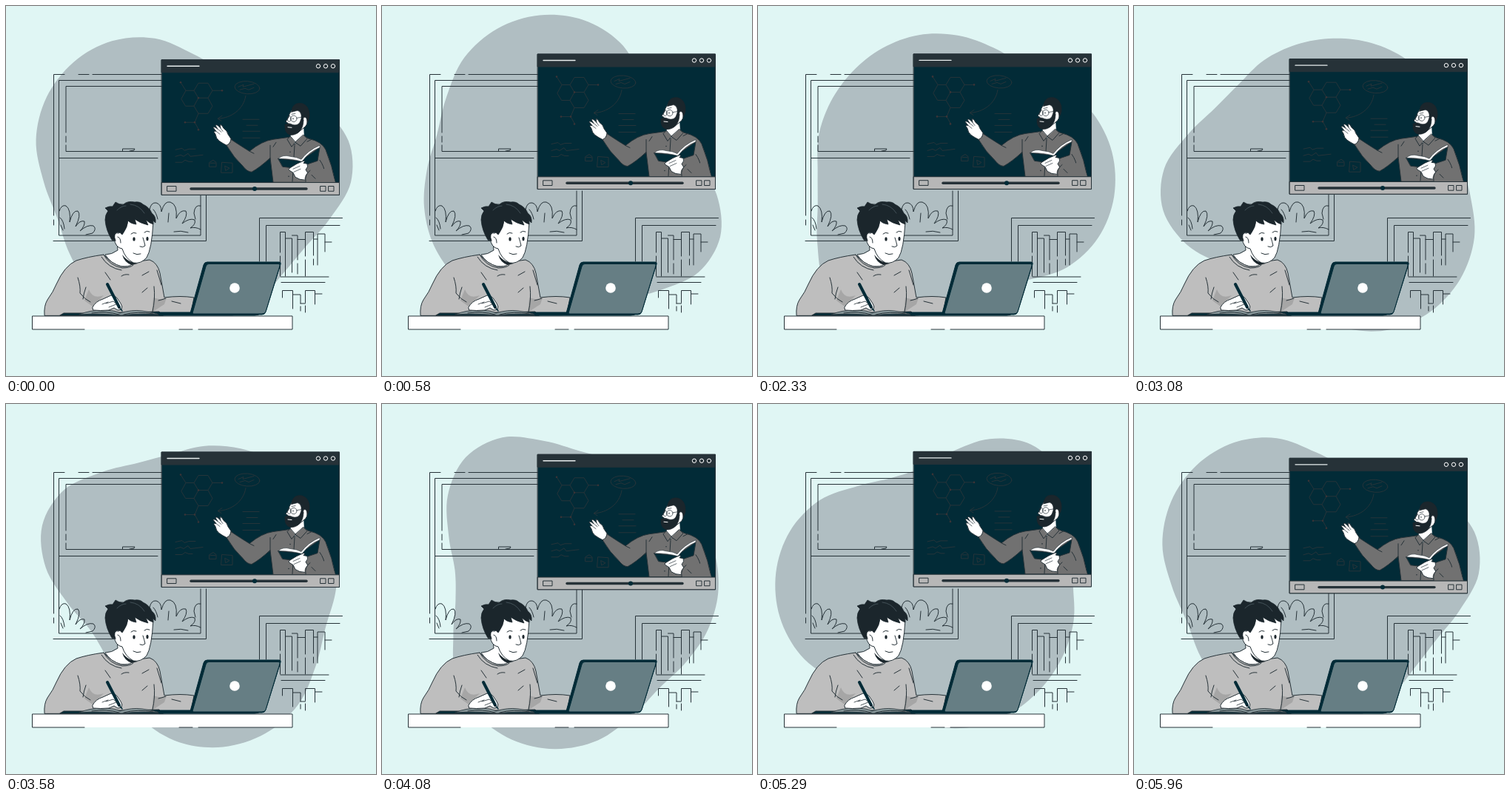
An HTML page with a canvas for the animation above (6 s loop, 500 px wide and 500 px high).

```html
<!DOCTYPE html>
<html lang="en">
<head>
<meta charset="utf-8">
<title>Online lesson</title>
<style>
html, body { margin: 0; width: 100%; height: 100%; overflow: hidden; background: #e0f6f4; }
canvas { display: block; width: 500px; height: 500px; }
</style>
</head>
<body>
<canvas id="stage" width="500" height="500"></canvas>
<script>
const ctx = document.getElementById('stage').getContext('2d');
const LOOP = 6000, FLOAT = 1500, RISE = 10;
const INK = '#263238', HAIR = '#1b262c', NAVY = '#022b37', PAPER = '#e0f6f4';
const WHITE = '#fff', KNIT = '#bebebe', BAR = '#b7b7b7', SHIRT = '#717171', SLATE = '#667e84', BLOB = '#b0bec2';

function shape(d, fill, stroke = INK, width = 1) {
  const p = new Path2D(d);
  if (fill) { ctx.fillStyle = fill; ctx.fill(p); }
  if (stroke) { ctx.strokeStyle = stroke; ctx.lineWidth = width; ctx.stroke(p); }
}
const line = (d, color = INK, width = 1) => shape(d, null, color, width);

function oval(x, y, rx, ry, fill, stroke, width = 1, tilt = 0) {
  ctx.beginPath();
  ctx.ellipse(x, y, rx, ry, tilt, 0, Math.PI * 2);
  if (fill) { ctx.fillStyle = fill; ctx.fill(); }
  if (stroke) { ctx.strokeStyle = stroke; ctx.lineWidth = width; ctx.stroke(); }
}

// Blob outline: radius at every 15 degrees
const radii = [213, 191, 175, 173, 182, 189, 195, 200, 202, 199, 193, 190,
  202, 220, 229, 229, 220, 201, 173, 156, 155, 173, 200, 217];
const knots = radii.map((r, i) => {
  const a = i * Math.PI / 12;
  return [r * Math.cos(a), r * Math.sin(a)];
});

function drawBlob(turn) {
  const n = knots.length, at = i => knots[(i + n) % n];
  ctx.save();
  ctx.translate(253, 238);
  ctx.rotate(turn);
  ctx.beginPath();
  ctx.moveTo(...at(0));
  for (let i = 0; i < n; i++) {
    const [a, b, c, d] = [at(i - 1), at(i), at(i + 1), at(i + 2)];
    ctx.bezierCurveTo(
      b[0] + (c[0] - a[0]) / 6, b[1] + (c[1] - a[1]) / 6,
      c[0] - (d[0] - b[0]) / 6, c[1] - (d[1] - b[1]) / 6, c[0], c[1]);
  }
  ctx.closePath();
  ctx.fillStyle = BLOB;
  ctx.fill();
  ctx.restore();
}

function drawRoom() {
  // window
  line('M64.5 283V92.5H79M98 92.5H112M117 92.5H212M64.5 289V296M64 317.5H270.5V250');
  line('M212 100.5H71.5V310H263V250');
  line('M212 108.5H81V171M81 176V184M81 188V196.5H212M72 205.5H205');
  line('M157.5 196V193H174L173 195L167 196');
  // bushes
  line('M72 277Q75 268 81 270Q88 275 86 292Q90 276 97 277Q102 282 94 298Q100 289 106 291Q107 297 100 304Q110 295 118 297Q123 301 117 307L108 309');
  line('M73 286Q78 290 79 301M74 296L77 303');
  line('M194 275Q196 265 203 266Q210 268 210 278Q214 263 222 265Q232 268 230 287Q235 275 243 277Q246 283 238 294Q248 286 255 289Q257 295 249 300Q256 298 263 302');
  line('M199 275Q203 279 205 288M220 280L219 292M263 270Q255 268 254 280L256 288M227 305Q236 303 246 306');
  // shelves
  line('M342.5 345V286.5H454.5M351.5 345V296.5H451M371 366H436M372 373.5H431');
  line('M370.5 333V305.5H377.5V365M370.5 338V365M377.5 314H386.5V360M386.5 310H394V343M394 348V362');
  line('M394 315.5H404.5M404.5 338V305.5H415.5V337M404.5 343V365M415.5 342V350M415.5 315H421M421 350V308H431V332M431 319H440');
  line('M373.5 394V384.5H387.5V409M387.5 390H398V402M404.5 401V384.5H417.5V403M417.5 389H427M398 402H404.5M398 406V412M404.5 405V414');
}

function drawDoodles() {
  const chalk = '#26343a', node = '#3a3437';
  line('M237 125L243 114H254L260 124L254 135H243ZM254 114L260 104H273L279 114L273 124H260M273 124L279 135L273 145H260L254 135', chalk);
  line('M243 114L236 103M279 114H292M260 145L255 157H242M255 157L260 166', chalk);
  for (const [x, y] of [[236, 103], [292, 114], [260, 124], [242, 157], [255, 157], [260, 167]])
    oval(x, y, 1.3, 1.3, node);
  oval(326, 110, 17, 8.5, null, chalk, 1, .08);
  line('M314 109L321 106L320 109L335 105M316 113L323 111L328 113L335 110', chalk);
  line('M324 121C321 140 304 151 287 152M292 148L286 152L291 155', chalk);
  line('M320 153H342M325 161H340M320 169H343M320 178H343', chalk);
  line('M229 194L238 192L241 195L247 193H256M229 203L236 201L240 203L246 199L249 203L266 201M229 211H238L242 208L247 210H252', chalk);
  line('M275 211L280 208L284 211V217H275ZM276 212H283M292 211L306 212V225H291ZM296 216L302 219L297 222Z', chalk);
}

function drawTeacher() {
  // neck and raised hand
  shape('M386 168L384 179L391 187L403 177L402 160Z', WHITE, null);
  shape('M305 181L300 189Q292 185 288 182Q284 179 283 173L281 170Q281 168 284 169L280 164Q281 162 286 166L283 161Q285 159 290 165L289 160Q292 160 294 165Q299 168 300 173Z', WHITE);
  line('M284 169L289 173M286 166L291 170M290 165L293 169', INK, .7);
  // shirt
  shape('M304 180Q319 190 329 196Q346 182 361 180L383 177L390 187L402 175L409 179Q427 183 432 194Q441 216 445 238H361L357 205Q343 218 332 224Q326 224 320 216Q308 205 298 188Q303 186 304 180Z', SHIRT);
  line('M357 188L357 206L354 208M329 196L335 199M424 208Q430 216 431 226M390 188L387 237M407 183L413 180M365 184L361 190');
  shape('M384 176L380 180L386 190L391 184ZM402 174L407 179L398 189L391 184Z', SHIRT);
  oval(384, 197, .8, .8, INK);
  oval(382, 230, .8, .8, INK);
  // head
  shape('M386 141Q382 146 382 150L378 156L381 158L381 167L394 171L403 164Q408 160 407 153L406 141L395 137Z', WHITE);
  shape('M386 143Q386 135 392 132Q401 129 407 136Q411 142 410 150Q409 155 407 157Q407 151 404 150Q401 150 402 155L399 154L399 147Q398 142 394 141Q390 142 386 143Z', HAIR, HAIR, .6);
  shape('M377 160Q382 157 387 160Q394 162 397 157L399 152L402 154Q402 163 397 169Q391 175 384 174Q376 172 377 160Z', HAIR, HAIR, .6);
  line('M381 163.5L386 164', WHITE, 1);
  oval(389, 152, 4, 4.2, WHITE, INK, .7);
  oval(382.5, 152, 2.3, 4, null, INK, .7);
  line('M393 151L400 150M386 146L391 145', INK, .7);
  oval(388, 152, .7, .9, INK);
  // book
  shape('M368 206L398 209L424 191L421 209L409 213L399 220L374 217Z', NAVY);
  shape('M368 206Q374 200 384 203Q394 204 399 207Q408 195 424 188L424 191Q409 197 400 210Q386 206 368 206Z', WHITE, INK, .6);
  shape('M383 219Q388 216 393 213L402 209Q405 209 402 212L407 213Q409 217 405 221L410 229L405 235Q396 235 391 231L388 225L383 222Q381 220 383 219Z', WHITE);
  line('M388 220L397 216M389 224L398 220', INK, .7);
  shape('M410 224Q402 228 404 236L406 238H445L438 218Z', SHIRT, null);
  line('M411 222Q403 228 405 237M413 228L418 233');
}

function drawScreen(dy) {
  ctx.save();
  ctx.translate(0, dy);
  shape('M210.5 72.5H450.5V255H210.5Z', NAVY);
  shape('M210.5 72.5H450.5V89.5H210.5Z', INK);
  line('M218 81H261', '#e8eeee', 1.3);
  for (const x of [422, 432, 442]) oval(x, 81, 2.7, 2.7, null, WHITE);
  drawDoodles();
  drawTeacher();
  shape('M210.5 238.3H450.5V255H210.5Z', BAR);
  line('M218 243.3H230V250H218ZM425 243.3H432V250H425ZM436 243.3H443V250H436Z');
  line('M250 246.8H406', INK, 3.4);
  oval(336, 246.8, 3, 3, NAVY);
  ctx.restore();
}

function drawStudent() {
  // neck
  shape('M150 318L151 330Q143 336 134 336Q142 349 156 352Q166 353 172 350L167 340Z', WHITE);
  // sweater
  shape('M52 418Q51 405 56 397Q64 386 68 376Q79 351 95 344Q110 339 132 336Q142 348 156 352Q166 353 170 349L172 346L194 343Q205 347 208 361L214 394Q236 391 254 394L250 416L205 418Z', KNIT);
  shape('M112 383Q117 397 132 391L123 400L117 406L106 398ZM199 394Q210 398 217 394L214 403Q205 409 197 414Z', '#a6a6a6', null);
  line('M132 336Q140 351 157 354Q168 354 172 350M129 339Q138 354 156 357');
  line('M97 367Q101 379 100 388Q107 397 114 400M108 380Q105 388 104 396M204 357L210 377M200 379Q202 396 198 413M156 365Q160 362 166 363M184 364L193 359M184 387L191 381M134 360L141 370M216 395Q211 397 206 398M224 399L236 402');
  // face
  shape('M152 307Q146 305 146 314Q148 327 157 328Q161 341 172 347Q182 349 190 340Q197 329 199 291L180 282L161 286Z', WHITE);
  shape('M157 336Q163 344 172 347L178 348L170 350Q160 347 157 336Z', HAIR, null);
  shape('M143 316Q135 303 134 289Q134 282 138 277L134 273Q140 270 144 271L148 265Q153 269 159 268Q164 263 174 265Q181 264 185 268Q194 272 197 280Q203 284 202 293L198 289L199 295Q193 293 189 289L192 296Q180 293 174 288L176 295Q168 294 165 290Q164 299 159 306L157 309Q152 303 147 308Q146 313 148 317Z', HAIR, HAIR, .8);
  line('M168 268Q180 269 187 280M150 276Q156 270 162 270', '#53636a', .7);
  line('M151 312Q155 313 155 320M169 308Q172 305 176 307M187 306Q190 303 194 305M185 313Q187 319 188 324Q185 327 181 325M172 334Q177 337 182 335');
  oval(173, 315, 1.7, 2.7, HAIR);
  oval(191, 314.5, 1.6, 2.7, HAIR);
}

function drawDesk() {
  shape('M35.5 419H387V437H35.5Z', WHITE, null);
  line('M106 437H35.5V419H387V437H260M234 437H252');
  // notebook
  shape('M73 418L78 415L110 415L207 413L212 418Z', NAVY);
  shape('M99 417Q115 410 131 412Q145 410 154 415Q170 410 184 412Q198 414 208 417Q180 415 156 418Q125 415 99 417Z', '#87979a', INK, .8);
  line('M116 415Q136 412 153 417M159 417Q178 412 199 416');
  // pen and hand
  shape('M117 407Q121 399 131 396L142 391Q149 392 151 396L155 402Q158 406 156 410L151 411L146 408L139 411Q127 412 118 411Z', WHITE);
  line('M137 376L153 407', NAVY, 4);
  line('M153 407L157 412', NAVY, 1.5);
  line('M135 402L145 399L152 405M139 407L149 403M130 403L138 400', INK, .8);
  // laptop
  shape('M207 414H252L344 415Q342 418 336 418H207Z', NAVY, NAVY);
  shape('M249 415L267 350Q268 346 272 346H369Q372 346 371 349L351 413Q350 417 346 417H250Z', NAVY, NAVY);
  shape('M252 415L270 352Q271 348.5 274 348.5H368Q371 348.5 370 351L351 413Q350 416 346 416H254Z', SLATE, NAVY);
  oval(309, 381, 6.8, 6.8, WHITE);
}

function draw(now) {
  const t = now % LOOP;
  const phase = ((t + 40) % FLOAT) / FLOAT;
  const lift = RISE * (1 - Math.abs(1 - 2 * phase));
  ctx.fillStyle = PAPER;
  ctx.fillRect(0, 0, 500, 500);
  drawBlob(t / LOOP * Math.PI * 2);
  drawRoom();
  drawScreen(.8 - lift);
  drawStudent();
  drawDesk();
}

ctx.lineJoin = ctx.lineCap = 'round';
const start = performance.now();
function tick() {
  draw(performance.now() - start);
  requestAnimationFrame(tick);
}
tick();
</script>
</body>
</html>
```
